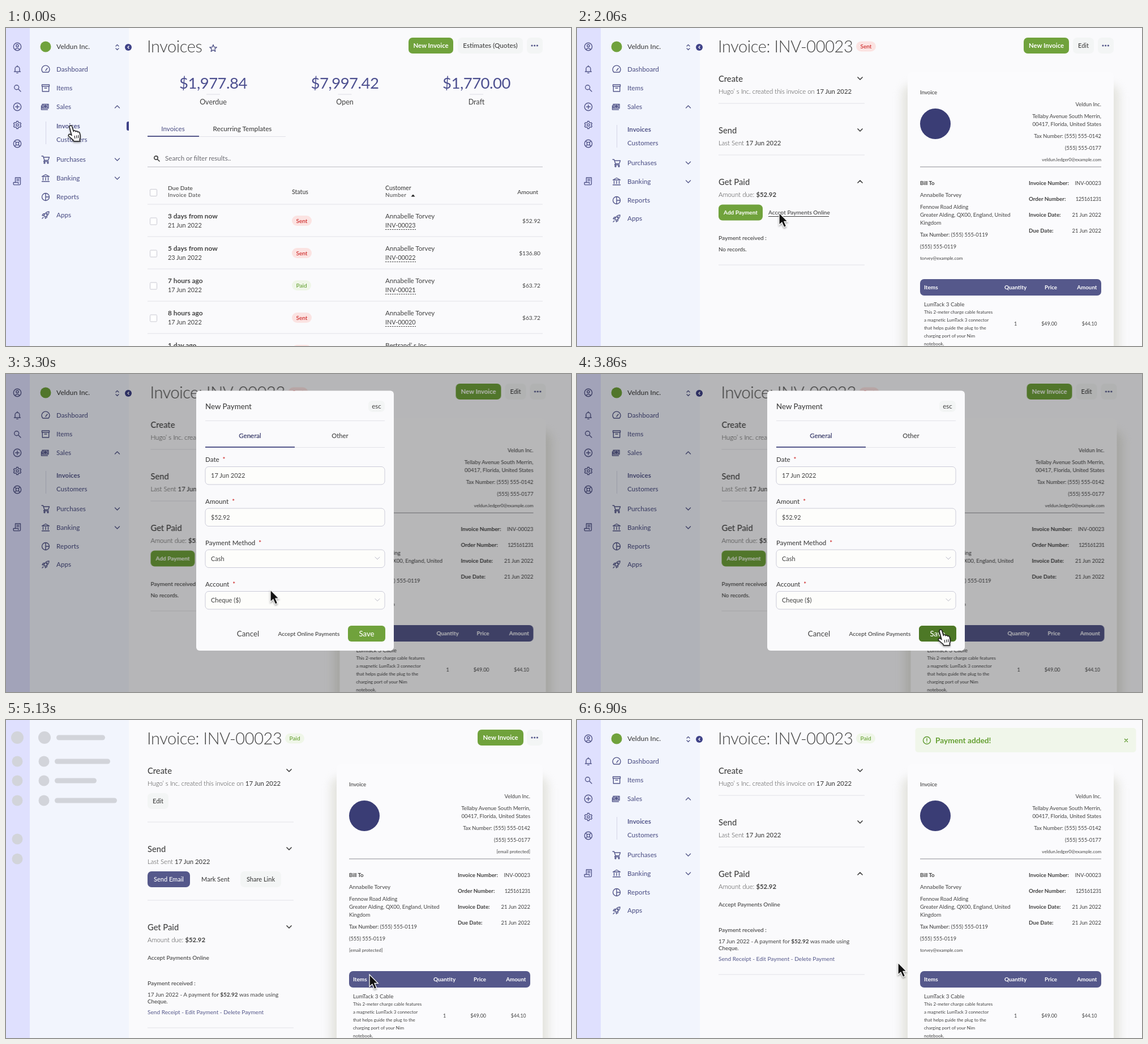
These frames come from a looping animation (998x561 px, 7 s). An HTML page:

```html
<!DOCTYPE html>
<html lang="en">
<head>
<meta charset="utf-8">
<title>Invoice payment</title>
<style>
html, body { margin: 0; width: 100%; height: 100%; overflow: hidden; background: #fafafc; }
svg { display: block; width: 998px; height: 561px; }
text { font-family: Lato, "Open Sans", sans-serif; fill: #424242; white-space: pre; }
.l { font-weight: 300; }
.m { font-weight: 500; }
.b { font-weight: 700; }
.c { text-anchor: middle; }
.e { text-anchor: end; }
.p { fill: #55588b; }
.w { fill: #fff; }
.g { fill: #6a6a70; }
.r { fill: #cc2222; }
.k { fill: #65a032; }
.h { letter-spacing: -.4px; }
.n { letter-spacing: -.5px; fill: #4d5090; }
.s { letter-spacing: .4px; }
.i { fill: none; stroke: #55588b; stroke-width: 1.4; stroke-linecap: round; stroke-linejoin: round; }
.d { stroke: #424242; stroke-width: 1.7; }
#bar1, #bar2 { transform-origin: 0 0; }
#editRow, #sendRow { transform-box: fill-box; }
#shade { filter: blur(8px); }
#cursor { filter: drop-shadow(0 2px 1.5px rgba(0,0,0,.35)); }
</style>
</head>
<body>
<svg id="stage" viewBox="0 0 998 561"></svg>
<script>
const LOOP = 7000;
const GREEN = '#70a23c', PALE = '#f3f5f5', PURPLE = '#55588b';

// drawing helpers: y is the middle of the capitals
const t = (x, y, s, size, cls = '') =>
  `<text x="${x}" y="${y + size * .36}" font-size="${size}" class="${cls}">${s}</text>`;
const box = (x, y, w, h, fill, r = 0, more = '') =>
  `<rect x="${x}" y="${y}" width="${w}" height="${h}" rx="${r}" fill="${fill}" ${more}/>`;
const dot = (x, y, r, fill) => `<circle cx="${x}" cy="${y}" r="${r}" fill="${fill}"/>`;
const line = (x1, x2, y, color = '#e2e2e8', w = 1) => box(x1, y - w / 2, x2 - x1, w, color);
const icon = (x, y, d, cls = '') => `<path class="i ${cls}" transform="translate(${x} ${y})" d="${d}"/>`;
const ring = (r, x = 0, y = 0) => `M${x - r} ${y}a${r} ${r} 0 1 0 ${2 * r} 0a${r} ${r} 0 1 0 ${-2 * r} 0`;
const group = (id, ...parts) => `<g id="${id}">${parts.join('')}</g>`;
const button = (x, y, w, label, fill, size, cls, h = 28) =>
  box(x, y, w, h, fill, 7) + t(x + w / 2, y + h / 2, label, size, 'c ' + cls);
const pill = (x, y, label) => label === 'Paid'
  ? box(x, y - 9, 34, 18, '#eff6e8', 9) + t(x + 17, y, label, 10.1, 'c m k')
  : box(x, y - 9, 35, 18, '#fbe3e2', 9) + t(x + 17.5, y, label, 10.1, 'c m r');
const more = box(920, 17, 28, 28, PALE, 7) + [929, 933.7, 938.4].map(x => dot(x, 31, 1.6, PURPLE)).join('');
const DOWN = 'M-4-2L0 2L4-2', UP = 'M-4 2L0-2L4 2';

// left rail and side menu
const gear = 'M-1.3-6.5h2.6l.5 2 1.5.9 2-.6 1.3 2.2-1.5 1.4v1.2l1.5 1.4-1.3 2.2-2-.6-1.5.9-.5 2h-2.6l-.5-2-1.5-.9-2 .6-1.3-2.2 1.5-1.4v-1.2l-1.5-1.4 1.3-2.2 2 .6 1.5-.9z';
const rail = [
  [33, ring(6.7) + ring(2.1, 0, -1.6) + 'M-4 4.8c2-2.6 6-2.6 8 0'],
  [73, 'M-5.5 4h11M-4 4v-5a4 4 0 0 1 8 0v5M0-5v-1.5M-1.2 6.4h2.4'],
  [106, ring(4, -1.3, -1.3) + 'M1.8 1.8L6 6'],
  [139, ring(6.7) + 'M-3.3 0h6.6M0-3.3v6.6'],
  [171, gear + ring(2.1)],
  [204, ring(6.7) + ring(2.6) + 'M-4.7-4.7l2.8 2.8M4.7-4.7l-2.8 2.8M-4.7 4.7l2.8-2.8M4.7 4.7l-2.8-2.8'],
  [270, 'M-3.5 2v-8h9v11a1.6 1.6 0 0 1-1.6 1.6h-9.4a1.3 1.3 0 0 1-1.3-1.3V2.5h8.5v2.3M-1-3.2h4M-1-.6h4']
].map(([y, d]) => icon(20, y, d)).join('');

const menu = [
  [73, 'Dashboard', 'M-5 5a7 7 0 1 1 10 0zM0 2l3-4'],
  [106, 'Items', 'M-6.5-6h13v3h-13zM-5.7-3v9h11.4v-9M-2 0h4'],
  [139, 'Sales', 'M-6-4.5h11v7h-11zM-7.5-2v7h11' + ring(1.8, -.5, -1) + ring(.7, -.5, -1) + 'M-4-4v6M3-4v6']
], lower = [
  [232, 'Purchases', 'M-7-6h2.5l2.5 7.5h6.5l2-5.5h-10M-2 1.5l-1.5 2h8.5' + ring(1, -2, 6) + ring(1, 4, 6)],
  [265, 'Banking', 'M-6.5-3L0-6.5L6.500-3zM-4.500-1v4.500M0-1v4.500M4.500-1v4.500M-6.500 5.800h13'],
  [298, 'Reports', ring(6.5) + 'M0-6.500v13M0 0h6.500'],
  [330, 'Apps', 'M-3 1c1-4 4.500-7 9-7c0 4.500-3 8-7 9zM-3 1l-3-.5l2-2.800h3M-1 3l.5 3l2.800-2v-3M-4 4l-2 2' + ring(1, 2, -2)]
];
const item = ([y, label, d]) => icon(70, y, d) + t(89, y, label, 11.7, 'p m');
const nav = group('nav', rail, dot(70, 33, 9.5, GREEN), t(89, 33, 'Veldun Inc.', 12.2, 'm'),
  icon(196.500, 34, 'M-2.500-2L0-4.500L2.500-2M-2.500 2L0 4.500L2.500 2'),
  dot(216, 34, 6, '#3f4288'), icon(216, 34, 'M1-2L-1 0L1 2" style="stroke:#fff'),
  menu.map(item).join(''), icon(196.500, 139, UP),
  group('low', box(70, 165, 1, 40, '#d5d6e6'), t(89, 173, 'Invoices', 11.500, 'p b'),
    t(89, 197, 'Customers', 11.500, 'p m'), lower.map(item).join(''),
    icon(196.500, 232, DOWN), icon(196.500, 265, DOWN),
    group('mark', box(213, 165, 6, 16, '#3f4288', 3), box(217, 165, 3, 16, '#fafafc'))));

const GREY = '#d2d4da';
const skeleton = group('skel',
  [73, 107, 142, 210, 245].map(y => dot(20, y, 9.500, GREY)).join(''),
  [73, 107, 142].map(y => dot(67, y, 9.500, GREY)).join(''),
  dot(20, 31, 11, GREY), dot(68, 31, 11, GREY),
  [[89, 31, 86], [86, 73, 98], [86, 107, 74], [86, 142, 110]].map(([x, y, w]) => box(x, y - 4.500, w, 9, GREY, 4.500)).join(''));

// invoice list
const rows = [
  ['3 days from now', '21 Jun 2022', 'Sent', 'INV-00023', '$52.92'],
  ['5 days from now', '23 Jun 2022', 'Sent', 'INV-00022', '$136.80'],
  ['7 hours ago', '17 Jun 2022', 'Paid', 'INV-00021', '$63.72'],
  ['8 hours ago', '17 Jun 2022', 'Sent', 'INV-00020', '$63.72'],
  ['1 day ago', '16 Jun 2022', 'Sent', 'INV-00019', '$63.72']
];
const check = y => box(254.500, y - 6, 12, 12, '#fff', 1.500, 'stroke="#c9c9d2"');
const row = ([due, day, status, no, sum], i) => `<g transform="translate(0 ${57 * i})">` +
  check(341) + t(286, 332, due, 11.900, 'b') + t(286, 348, day, 10.900) + pill(505, 340, status) +
  t(670, 332, i < 4 ? 'Annabelle Torvey' : 'Bertrand\u2019 s Inc.', 11.600) + t(670, 348, no, 10.800) +
  '<path d="M670 355.500h54" stroke="#424242" stroke-dasharray="2.500 1.500"/>' +
  t(944, 340, sum, 10.200, 'e') + line(250, 948, 368) + '</g>';
const total = (x, sum, label) => t(x, 97, sum, 27.500, 'c n') + line(x - 12, x + 12, 117, '#dcdce4') + t(x, 130, label, 12.500, 'c');
const star = Array.from({length: 10}, (_, k) => {
  const r = k % 2 ? 2.900 : 6.500, a = k * Math.PI / 5;
  return (r * Math.sin(a)).toFixed(1) + ' ' + (-r * Math.cos(a)).toFixed(1);
}).join('L');

const list = group('list', t(249, 33, 'Invoices', 29, 'l h'), icon(366, 36, 'M' + star + 'z'),
  button(711, 17, 79, 'New Invoice', GREEN, 11.300, 'b w'),
  button(798, 17, 115, 'Estimates (Quotes)', PALE, 11.700, 'm'), more,
  total(366, '$1,977.84', 'Overdue'), total(598.500, '$7,997.42', 'Open'), total(831, '$1,770.00', 'Draft'),
  t(295, 178, 'Invoices', 11.600, 'c p m'), t(417.500, 178, 'Recurring Templates', 11.700, 'c m'),
  line(341, 494, 191.500), line(250, 341, 191, PURPLE, 2),
  icon(266, 230, ring(3.200, -1, -1) + 'M1.500 1.500L5 5', 'd'), t(281, 230, 'Search or filter results..', 11.600, 'g'),
  line(250, 948, 245, '#b9b9c2'), check(290.500),
  t(286, 282, 'Due Date', 10.400, 'm'), t(286, 295, 'Invoice Date', 9.700, 's'),
  t(505, 289, 'Status', 10.600, 'm'), t(670, 282, 'Customer', 10.600, 'm'), t(670, 295, 'Number', 9.700, 's'),
  '<path d="M715.500 297.500l3.500-4l3.500 4z" fill="#222"/>', t(940, 289, 'Amount', 10.400, 'e m'),
  line(250, 948, 311), rows.map(row).join(''));

// invoice sheet
const mails = (id, a, b) => group(id, t(926, 232, a, 8, 'e'), t(606, 406, b, 8));
const field = (y, label, value, cls = '') => t(798, y, label, 9.700, 'b') + t(926, y, value, 9.400, 'e ' + cls);
const sheet = box(574, 100, 384, 500, '#dcdcd4', 18, 'id="shade" opacity=".75"') +
  box(584, 78, 364, 500, '#fbfbfd', 7) +
  t(606, 114, 'Invoice', 9.600, 'm') + dot(633, 169, 27, '#3a3d75') +
  t(926, 135, 'Veldun Inc.', 9.400, 'e') +
  t(926, 156, 'Tellaby Avenue South Merrin,', 9.500, 'e') + t(926, 170, '00417, Florida, United States', 9.500, 'e') +
  t(926, 191, 'Tax Number: (555) 555-0142', 9.300, 'e') + t(926, 212, '(555) 555-0177', 9.200, 'e') +
  line(606, 926, 245, '#8d8d94') +
  t(606, 274, 'Bill To', 9.600, 'b') + t(606, 295, 'Annabelle Torvey', 9.700) + t(606, 316, 'Fennow Road Alding', 9.500) +
  t(606, 330, 'Greater Alding, QX00, England, United', 9.500) + t(606, 344, 'Kingdom', 9.500) +
  t(606, 365, '<tspan class="m">Tax Number:</tspan> (555) 555-0119', 9.400) + t(606, 386, '(555) 555-0119', 9.200) +
  mails('mails', 'veldun.ledger0@example.com', 'torvey@example.com') +
  mails('hidden', '[email protected]', '[email protected]') +
  field(274, 'Invoice Number:', 'INV-00023') + field(302, 'Order Number:', '125161231', 'h') +
  field(330, 'Invoice Date:', '21 Jun 2022') + field(358, 'Due Date:', '21 Jun 2022') +
  box(606, 443, 320, 29, PURPLE, 7) + t(613, 457, 'Items', 10, 'b w') + t(774.500, 457, 'Quantity', 9.900, 'b w c') +
  t(848, 457, 'Price', 9.800, 'b w e') + t(918.500, 457, 'Amount', 9.800, 'b w e') +
  t(613, 487, 'LumTack 3 Cable', 9.800) +
  ['This 2-meter charge cable features', 'a magnetic LumTack 3 connector', 'that helps guide the plug to the',
   'charging port of your Nim', 'notebook.'].map((s, i) => t(613, 501.500 + 14 * i, s, 8)).join('') +
  t(774.500, 522, '1', 9, 'c') + t(848, 522, '$49.00', 8.900, 'e') + t(918.500, 522, '$44.10', 8.500, 'e');

// invoice page
const day = '<tspan class="m">17 Jun 2022</tspan>';
const head = (y, title, sub) => t(250, y, title, 14.700, 'm') + t(250, y + 22, sub, 11.350, 'l');
const doc = group('doc', sheet, t(249, 33, 'Invoice: INV-00023', 29, 'l h'),
  head(90, 'Create', 'Hugo\u2019 s Inc. created this invoice on ' + day), icon(500, 89, DOWN, 'd'),
  group('editRow', button(250, 129, 37, 'Edit', PALE, 11, 'm')),
  group('send', line(250, 508, 133), head(181, 'Send', 'Last Sent ' + day), icon(500, 180, DOWN, 'd'),
    group('sendRow', button(250, 220, 75, 'Send Email', PURPLE, 11, 'm w'), t(370, 234, 'Mark Sent', 11, 'c m'),
      button(414, 220, 72, 'Share Link', PALE, 11, 'm'))),
  group('pay', line(250, 508, 224), head(272, 'Get Paid', 'Amount due: <tspan class="b">$52.92</tspan>'),
    group('payDown', icon(500, 271, DOWN, 'd')), group('payUp', icon(500, 271, UP, 'd')),
    t(250, 370.500, 'Payment received :', 10.200, 'm'),
    group('unpaidBody', button(250, 311.500, 78, 'Add Payment', GREEN, 10, 'b w'), t(338, 325.500, 'Accept Payments Online', 10.100, 'm'),
      group('under', line(338, 445, 332.500, '#424242')), t(250, 390, 'No records.', 9.800, 'm'), line(250, 508, 418)),
    group('paidBody', t(250, 325.500, 'Accept Payments Online', 10.100, 'm'),
      t(250, 390, '17 Jun 2022 - A payment for <tspan class="b">$52.92</tspan> was made using', 10),
      t(250, 402, 'Cheque.', 9.800, 'm'),
      t(250, 421, 'Send Receipt - Edit Payment - Delete Payment', 10.100, 'p'), line(250, 508, 449))),
  group('unpaidTop', pill(493, 32.500, 'Sent'), button(789, 17, 80, 'New Invoice', GREEN, 11.300, 'b w'),
    button(876, 17, 37, 'Edit', PALE, 11, 'm')),
  group('paidTop', pill(493, 32.500, 'Paid'), button(833, 17, 81, 'New Invoice', GREEN, 11.300, 'b w')), more);

const toast = group('toast', box(597.500, 14, 390, 43, '#f0f6ea', 5),
  icon(618, 36, ring(6.500) + 'M0-3.300V.8M0 3.200v.1', '" style="stroke:#5f9a30'),
  t(633, 36, 'Payment added!', 13.700, 'b k'), icon(970, 36, 'M-2.500-2.500l5 5M2.500-2.500l-5 5', '" style="stroke:#5f9a30'));

// payment dialog
const input = (y, label, value, pick) => t(352, y, label + '<tspan dx="6" class="r">*</tspan>', 11.600, 'm') +
  box(352, y + 12.500, 317, 31.500, '#fdfdfb', 6, 'stroke="#cbcbd8"') + t(362, y + 28.500, value, 11) +
  (pick ? `<path class="i" style="stroke:#b9b9c6;stroke-width:1" transform="translate(656 ${y + 27.500})" d="${DOWN}"/>` : '');
const dialog = group('dialog', box(0, 0, 998, 561, '#000', 0, 'opacity=".27"'),
  box(336, 29.500, 349, 458.500, '#fafafc', 6), t(352, 57, 'New Payment', 13.300, 'm'),
  button(640, 47, 29, 'esc', PALE, 11.500, '', 20), line(352, 669, 82.500),
  t(431, 109, 'General', 11.500, 'c m'), group('active', t(431, 109, 'General', 11.500, 'c m p')),
  t(590, 109, 'Other', 11.200, 'c m'), line(510, 669, 129.500), line(352, 510, 129, PURPLE, 2),
  input(151, 'Date', '17 Jun 2022'), input(224.500, 'Amount', ''),
  group('gap', t(362, 253, '$ 52.92', 10.700)), group('tight', t(362, 253, '$52.92', 10.700)),
  input(297.500, 'Payment Method', 'Cash', 1), input(371, 'Account', 'Cheque ($)', 1),
  t(427.500, 458, 'Cancel', 13.300, 'c'), t(535, 458, 'Accept Online Payments', 10.100, 'c m'),
  box(604, 444, 66, 28, GREEN, 6), group('hover', box(604, 444, 66, 28, '#4d7826', 6)),
  t(637, 458, 'Save', 13.200, 'c w m'));

const bars = box(0, 0, 998, 3, '#a9aae6', 0, 'id="bar1"') + box(0, 0, 998, 3, '#a9aae6', 0, 'id="bar2"');
const cursor = group('cursor',
  group('arrow', '<path d="M0 0V21.500L4.900 17L8.700 25.500L12.700 23.700L9 15.500H15.300z" fill="#111" stroke="#fff" stroke-width="1.300"/>'),
  group('hand', '<path d="M-1 1.500a2.400 2.400 0 0 1 4.600-1l2.600 8.500c1-1.600 3.400-1.200 4 .6 1.200-1.200 3.200-.6 3.600 1 1.400-.8 3 0 3.400 1.600l1 4.600c.6 3-.4 5-1 6.600l.4 3.400h-11l-1-2.400c-2.600-1.800-5.400-4.600-7.600-6.400-1.800-1.600 0-4.400 2.400-3.400l2.400 1.400z" fill="#fff" stroke="#222" stroke-width="1.600"/>' +
    '<path d="M8 17l.8 5M11.500 16.500l.6 5M14.800 16l.4 5" stroke="#222" stroke-width="1.200"/>'));

document.getElementById('stage').innerHTML =
  box(0, 0, 998, 561, '#fafafc') + list + doc + toast + box(42, 0, 175, 561, '#f2f5fd') +
  box(0, 0, 42, 561, '#dfe0fe') + nav + skeleton + dialog + bars + cursor;

// timeline in milliseconds; keys fall just before their picture is due
const css = [];
const pct = ms => (ms % LOOP ? ms - 2 : ms) / LOOP * 100;
const anim = (id, prop, stops, ease = 'linear') => {
  const name = `${id}-${prop}`;
  css.push(`@keyframes ${name}{${stops.map(([ms, v]) => `${pct(ms)}%{${prop}:${v}}`).join('')}}`,
    `#${id}{animation:${name} ${LOOP}ms ${ease} infinite}`);
};
const show = (ids, ...spans) => ids.split(' ').forEach(id =>
  anim(id, 'opacity', [[0, 0], ...spans.flatMap(([on, off]) => [[on, 1], [off, 0]])], 'step-end'));
const move = (id, ...stops) => anim(id, 'transform', stops.map(([ms, x, y]) => [ms, `translate(${x}px,${y}px)`]), 'ease-in-out');

show('list', [0, 1400]);
show('mark', [0, 240]);
show('unpaidTop unpaidBody', [1400, 5130]);
show('paidTop paidBody', [5130, LOOP]);
show('payDown', [1400, 1480], [5130, 5300]);
show('payUp', [1480, 5130], [5300, LOOP]);
show('under', [2040, 2140]);
show('mails', [1400, 5130], [5170, LOOP]);
show('hidden', [5130, 5170]);
show('dialog', [2500, 5130]);
show('gap', [2500, 2600]);
show('tight active', [2600, 5130]);
show('hand', [0, 200], [400, 1450], [3790, 4200]);
show('arrow', [200, 400], [1450, 3790], [4200, LOOP]);

const fade = [[0, 0], [1399, 0], [1400, 1], [1800, 1], [2000, 0], [5129, 0], [5130, 1], [5530, 1], [5760, 0], [LOOP, 0]];
anim('skel', 'opacity', fade);
anim('nav', 'opacity', fade.map(([ms, v]) => [ms, 1 - v]));
anim('low', 'transform', [[0, 'none'], [1400, 'translateY(6px)'], [LOOP, 'none']], 'step-end');
css.push(`@keyframes doc{0%{opacity:0;transform:none}${pct(1400)}%{opacity:1;transform:none}${pct(2500)}%{opacity:1;transform:translateX(5.500px)}${pct(5130)}%{opacity:1;transform:none}100%{opacity:1;transform:none}}`,
  `#doc{animation:doc ${LOOP}ms step-end infinite}`);

const fold = [5130, 5160, 5340];
move('send', [0, 0, 0], [5129, 0, 0], [fold[0], 0, 47], [fold[1], 0, 47], [fold[2], 0, 0], [LOOP, 0, 0]);
move('pay', [0, 0, 0], [5129, 0, 0], [fold[0], 0, 94], [fold[1], 0, 94], [fold[2], 0, 0], [LOOP, 0, 0]);
['editRow', 'sendRow'].forEach(id => anim(id, 'clip-path',
  [[0, 'inset(0 0 100% 0)'], [5129, 'inset(0 0 100% 0)'], [fold[0], 'inset(0 0 0 0)'], [fold[1], 'inset(0 0 0 0)'],
   [fold[2], 'inset(0 0 100% 0)'], [LOOP, 'inset(0 0 100% 0)']]));
anim('toast', 'opacity', [[0, 0], [5180, 0], [5360, 1], [LOOP, 1]]);
anim('hover', 'opacity', [[0, 0], [3740, 0], [3850, 1], [4200, 1], [4300, 0], [LOOP, 0]]);
anim('bar1', 'transform', [[0, 'scaleX(0)'], [2400, 'scaleX(0)'], [2530, 'scaleX(.466)'], [2660, 'scaleX(.75)'],
  [2900, 'scaleX(.75)'], [3040, 'scaleX(1)'], [3041, 'scaleX(0)'], [LOOP, 'scaleX(0)']]);
anim('bar2', 'transform', [[0, 'scaleX(0)'], [4130, 'scaleX(0)'], [4530, 'scaleX(1)'], [4560, 'scaleX(1)'],
  [4561, 'scaleX(0)'], [LOOP, 'scaleX(0)']]);
move('cursor', [0, 113, 173], [160, 113, 173], [460, 584, 348], [1700, 584, 348], [2060, 357, 326], [2100, 352, 326],
  [2260, 296, 324], [2900, 296, 324], [3600, 568, 414], [3860, 641, 452], [4130, 641, 452], [4200, 642, 449],
  [6730, 642, 449], [6900, 567, 428], [LOOP, 567, 428]);

document.head.appendChild(document.createElement('style')).textContent = css.join('\n');
</script>
</body>
</html>
```
